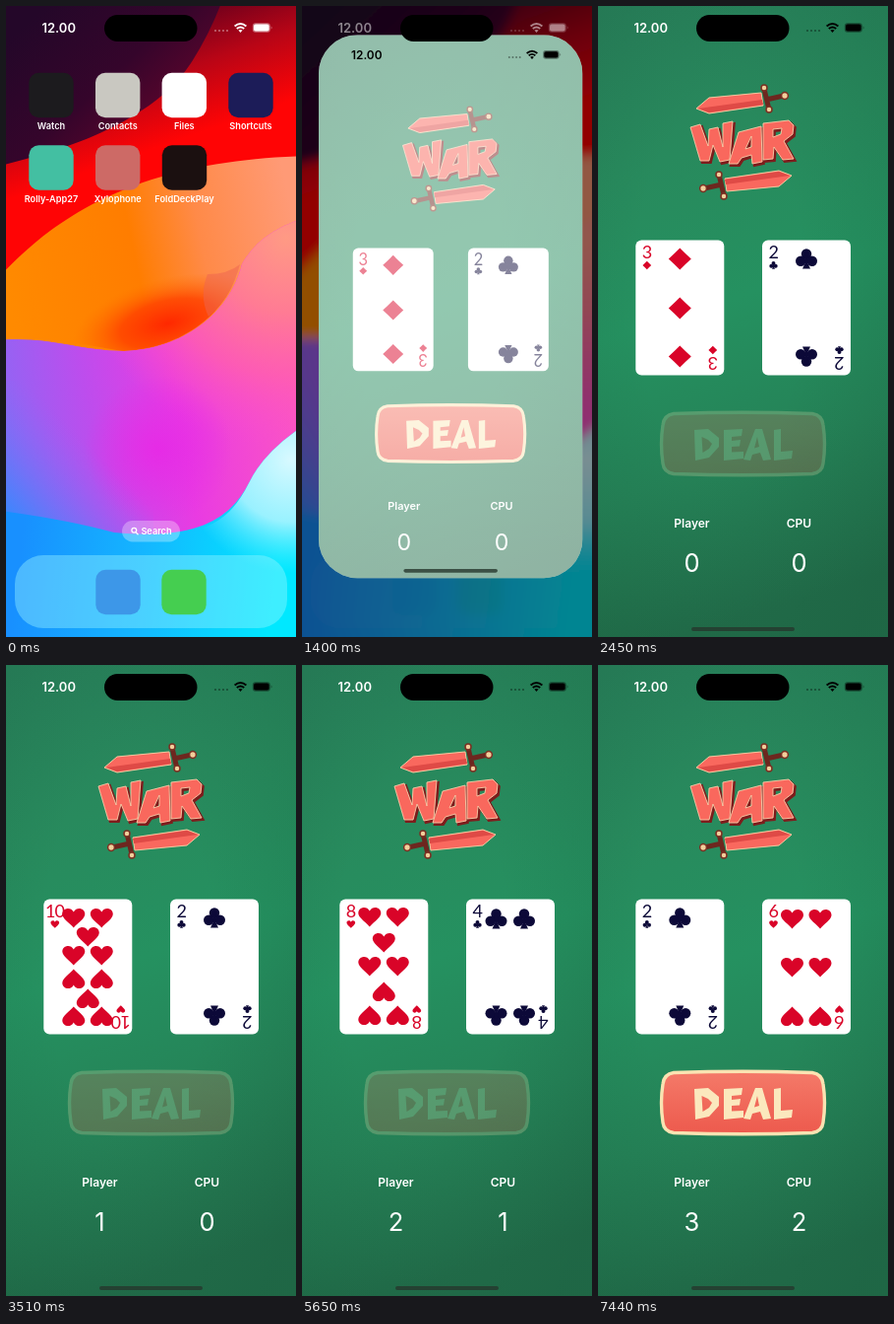
Animation, 295 px wide and 640 px high, one loop 8.11 s. Source, as an HTML page:

```html
<!DOCTYPE html>
<html lang="en">
<head>
<meta charset="utf-8">
<title>Card game</title>
<style>
  html, body { margin: 0; width: 100%; height: 100%; overflow: hidden; background: #000; }
  svg { display: block; width: 100vw; height: 100vh; }
  text { font-family: Inter, "Liberation Sans", sans-serif; text-anchor: middle; }
  .rank { font-family: Lato, "Open Sans", sans-serif; font-size: 18px; letter-spacing: -.05em; }
  .label { font-size: 9.2px; font-weight: 600; fill: #fff; }
</style>
</head>
<body>
<svg viewBox="0 0 295 640" preserveAspectRatio="none">
  <defs>
    <linearGradient id="red" gradientUnits="userSpaceOnUse" x1="225" y1="-10" x2="265" y2="105">
      <stop offset="0" stop-color="#6d001c"/><stop offset=".45" stop-color="#b80516"/><stop offset="1" stop-color="#ff0405"/>
    </linearGradient>
    <linearGradient id="night" gradientUnits="userSpaceOnUse" x1="40" y1="0" x2="150" y2="120">
      <stop offset="0" stop-color="#240729"/><stop offset=".6" stop-color="#35052b"/><stop offset="1" stop-color="#5a052c"/>
    </linearGradient>
    <linearGradient id="orange" gradientUnits="userSpaceOnUse" x1="0" y1="290" x2="295" y2="230">
      <stop offset="0" stop-color="#ff8a00"/><stop offset=".45" stop-color="#ff7d00"/><stop offset=".68" stop-color="#ff8a48"/><stop offset="1" stop-color="#ff9a76"/>
    </linearGradient>
    <radialGradient id="core" gradientUnits="userSpaceOnUse" cx="0" cy="0" r="1" gradientTransform="translate(165 322) rotate(-14) scale(100 46)">
      <stop offset="0" stop-color="#ff2800"/><stop offset=".5" stop-color="#ff4300" stop-opacity=".85"/><stop offset="1" stop-color="#ff7000" stop-opacity="0"/>
    </radialGradient>
    <linearGradient id="violet" gradientUnits="userSpaceOnUse" x1="0" y1="450" x2="295" y2="400">
      <stop offset="0" stop-color="#8f66f4"/><stop offset=".3" stop-color="#bd4ded"/><stop offset=".6" stop-color="#e93be2"/><stop offset="1" stop-color="#fb55c4"/>
    </linearGradient>
    <radialGradient id="pink" gradientUnits="userSpaceOnUse" cx="285" cy="235" r="215">
      <stop offset="0" stop-color="#ff9a84"/><stop offset=".35" stop-color="#ff7b94"/><stop offset=".65" stop-color="#ff5fae" stop-opacity=".8"/><stop offset="1" stop-color="#f94cd0" stop-opacity="0"/>
    </radialGradient>
    <radialGradient id="magenta" gradientUnits="userSpaceOnUse" cx="155" cy="450" r="75">
      <stop offset="0" stop-color="#e62be6"/><stop offset="1" stop-color="#e62be6" stop-opacity="0"/>
    </radialGradient>
    <linearGradient id="blueSide" gradientUnits="userSpaceOnUse" x1="0" y1="530" x2="85" y2="445">
      <stop offset="0" stop-color="#2a8dff"/><stop offset="1" stop-color="#8a6cf4" stop-opacity="0"/>
    </linearGradient>
    <linearGradient id="sea" gradientUnits="userSpaceOnUse" x1="10" y1="590" x2="270" y2="620">
      <stop offset="0" stop-color="#1890ff"/><stop offset=".5" stop-color="#14b8ff"/><stop offset="1" stop-color="#00e8ff"/>
    </linearGradient>
    <radialGradient id="foam" gradientUnits="userSpaceOnUse" cx="290" cy="460" r="115">
      <stop offset="0" stop-color="#d8f9ff"/><stop offset=".55" stop-color="#b4f4ff" stop-opacity=".85"/><stop offset="1" stop-color="#60e8ff" stop-opacity="0"/>
    </radialGradient>
    <linearGradient id="felt" x1=".15" y1="0" x2=".3" y2="1">
      <stop offset="0" stop-color="#28805a"/><stop offset=".25" stop-color="#288a5d"/><stop offset=".5" stop-color="#259160"/><stop offset=".75" stop-color="#258257"/><stop offset="1" stop-color="#226d4a"/>
    </linearGradient>
    <radialGradient id="feltEdge" cx=".42" cy=".45" r=".72">
      <stop offset=".4" stop-color="#0b4028" stop-opacity="0"/><stop offset="1" stop-color="#0b4028" stop-opacity=".14"/>
    </radialGradient>
    <linearGradient id="coral" x1="0" y1="0" x2="0" y2="1">
      <stop offset="0" stop-color="#f47a69"/><stop offset="1" stop-color="#ed5a4d"/>
    </linearGradient>
    <filter id="soft" x="-10%" y="-10%" width="120%" height="120%"><feGaussianBlur id="blur" stdDeviation="0"/></filter>
    <clipPath id="clip"><rect id="clipRect"/></clipPath>
    <g id="heart"><path d="M0 10C-4 5-11.5 1-11.5-4C-11.5-10-3-12 0-6C3-12 11.5-10 11.5-4C11.5 1 4 5 0 10Z"/></g>
    <g id="diamond"><path d="M0-11Q6-5 11.5 0Q6 5 0 11Q-6 5-11.5 0Q-6-5 0-11Z"/></g>
    <g id="club"><circle cy="-5" r="5.2"/><circle cx="-5.8" cy="2.2" r="5.2"/><circle cx="5.8" cy="2.2" r="5.2"/><path d="M-2-3H2L1.3 4L4 10H-4L-1.3 4Z"/></g>
    <g id="spade"><path d="M0-10C4-5 11-1 11 3C11 9 3 10 1 5L4 10H-4L-1 5C-3 10-11 9-11 3C-11-1-4-5 0-10Z"/></g>
    <g id="sword">
      <path d="M100 104L113 93L166 88L168 101L113 109Z" fill="#f9685e" stroke="#f7c9a0"/>
      <path d="M102 104L167 95L168 100L113 108Z" fill="#df4a46"/>
      <path d="M169 84L174 105M171 95L189 91" stroke="#6d271f" stroke-width="5"/>
      <g fill="#f3cf9b" stroke="#7b3023" stroke-width="1.5"><circle cx="169" cy="83" r="3"/><circle cx="174" cy="105" r="3"/><circle cx="190" cy="91" r="3.4"/></g>
    </g>
    <path id="title" fill-rule="evenodd" d="M94 123L104 120L112 142L113 125L122 123L127 143L127 119L137 117L134 156L124 158L117 141L113 157L104 157Z
      M143 128L166 122L167 158L157 160L156 151L146 154L142 160L133 160ZM156 132L156 143L150 145Z
      M168 119L194 116L199 121L198 130L189 137L199 155L188 156L179 143L178 155L168 156ZM178 125L187 124L186 130L178 133Z"/>
    <g id="courtHalf">
      <path d="M40 18L35 4L44 8L52 2L60 8L69 5L65 20L66 38L56 40L58 19Z" fill="#17133f"/>
      <path d="M40 13L66 12L65 17L41 18Z" fill="#c51f3a"/>
      <path d="M42 18H58V35L53 42H46L42 34L39 29Z" fill="#f8d4b0"/>
      <path d="M57 18H63Q60 27 64 35L56 38Z" fill="#a42a2b"/>
      <path d="M36 31Q43 33 45 28Q49 33 55 30Q47 38 36 31Z" fill="#a42a2b"/>
      <path d="M44 22H48M51 22H55" stroke="#17133f" stroke-width="1.5"/>
    </g>
  </defs>

  <g id="home">
    <g filter="url(#soft)">
      <path d="M-20-20H315V660H-20Z" fill="url(#red)"/>
      <path d="M-20-20H225Q212 20 190 55C165 95 110 137-20 165Z" fill="url(#night)"/>
      <path d="M-20 290C40 218 130 154 315 152V480H-20Z" fill="url(#orange)"/>
      <path d="M50 260H239C228 310 180 348 118 350L50 338Z" fill="url(#core)"/>
      <path d="M205 272Q226 272 238 262Q229 296 206 315Q196 294 205 272Z" fill="#ee6450" opacity=".5"/>
      <g id="wave">
        <path id="wavePath" d="M-20 340C45 333 70 350 120 350C180 348 228 312 240 262Q260 225 315 212V660H-20Z" fill="url(#violet)"/>
        <use href="#wavePath" style="fill:none"/>
      </g>
      <path d="M-20 340C45 333 70 350 120 350C180 348 228 312 240 262Q260 225 315 212V660H-20Z" fill="url(#pink)"/>
      <circle cx="155" cy="450" r="75" fill="url(#magenta)"/>
      <path d="M-20 380H150V570H-20Z" fill="url(#blueSide)"/>
      <path id="shore" d="M-20 510Q60 520 110 534C195 542 228 520 247 484Q264 448 315 418V660H-20Z" fill="url(#sea)"/>
      <path d="M180 533C215 530 233 512 247 484Q264 448 315 418V660H180Z" fill="url(#foam)"/>
      <g id="icons"></g>
    </g>
    <rect id="dim" width="295" height="640"/>
    <g id="homeStatus"></g>
  </g>

  <g id="app">
    <g clip-path="url(#clip)">
      <rect width="295" height="640" fill="#fff"/>
      <g id="content">
        <rect width="295" height="640" fill="url(#felt)"/>
        <rect width="295" height="640" fill="url(#feltEdge)"/>
        <use href="#sword"/>
        <use href="#sword" transform="rotate(180 148.5 138)"/>
        <use href="#title" x="1.8" y="2" fill="#7d1c1c" stroke="#7d1c1c" stroke-width="2"/>
        <use href="#title" fill="#f9685d" stroke="#f8cfaa" stroke-width=".9"/>
        <g id="cards"></g>
        <g id="button">
          <path d="M77 413.5Q147 411 218 413.5Q228 415 229 425Q232 444 229 464Q228 473 218 474.5Q147 477 77 474.5Q67 473 66 464Q63 444 66 425Q67 415 77 413.5Z" fill="url(#coral)" stroke="#fae3b2" stroke-width="3.4"/>
          <path fill="#fbe8bd" fill-rule="evenodd" d="M98 430L112 429L123 438L123 447L113 458L99 461ZM105.5 437L112 440L116 444L113 449L106.5 453Z
            M128 430L147 429L146 436L136 437V441L145 440L144 446.5L136 447V452.5L148 452V459L128 461Z
            M160 429L167 429L176 460L168 461L165 453L157 455L155 461L148 460ZM162 437L164 447L159 448.5Z
            M179 430L186 429V452L198 451L197 459L179 461Z"/>
        </g>
        <g fill="#fff">
          <g font-size="12" font-weight="600"><text x="95.5" y="529">Player</text><text x="204.5" y="529">CPU</text></g>
          <g font-size="25.5"><text id="playerScore" x="95.5" y="574"></text><text id="cpuScore" x="204.5" y="574"></text></g>
        </g>
      </g>
      <rect id="tile" width="295" height="640" fill="#1b1010"/>
      <g id="chrome">
        <g id="appStatus"></g>
        <rect id="homeBar" x="95" width="105" height="4" rx="2" fill="#26372e" opacity=".8"/>
      </g>
    </g>
  </g>
  <rect x="100" y="9" width="94.5" height="27" rx="13.5"/>
</svg>
<script>
const LOOP = 8110, LAUNCH = 1190, OPENED = 1940;
const $ = id => document.getElementById(id);
const clamp = v => Math.max(0, Math.min(1, v));
const mix = (a, b, p) => a + (b - a) * p;
const set = (id, attrs) => { for (const k in attrs) $(id).setAttribute(k, attrs[k]); };

// Each press reveals the next hand: [rank, suit] for player and CPU, then scores.
const hands = [
  { player: [3, 'diamond'], cpu: [2, 'club'], score: [0, 0] },
  { player: [10, 'heart'], cpu: [2, 'club'], score: [1, 0] },
  { player: [4, 'heart'], cpu: ['J', 'spade'], score: [1, 1] },
  { player: [8, 'heart'], cpu: [4, 'club'], score: [2, 1] },
  { player: [10, 'heart'], cpu: [8, 'club'], score: [3, 1] },
  { player: [2, 'club'], cpu: [6, 'heart'], score: [3, 2] }
];
const presses = [[2450, 2970], [3510, 4040], [4570, 5110], [5650, 6170], [6860, 7440]];

// Rows of pips: paired rows use two columns, single rows the middle one.
const layouts = {
  2: { single: [19, 118] },
  3: { single: [19, 69, 118] },
  4: { pair: [20, 118] },
  6: { pair: [20, 69, 119] },
  8: { pair: [18, 68, 118], single: [44, 94] },
  10: { pair: [19, 57, 81, 119], single: [38, 101] }
};

function pip(suit, x, y, scale = 1, flip = y > 75 && scale === 1) {
  return `<use href="#${suit}" transform="translate(${x} ${y}) scale(${scale}) rotate(${flip ? 180 : 0})"/>`;
}

function court() {
  return `<rect x="7" y="7" width="76" height="123" rx="5" fill="none" stroke="#17133f" stroke-width=".8"/>
    <path d="M4 4H20V35H4ZM70 102H86V133H70Z" fill="#fff"/>
    <use href="#courtHalf"/><use href="#courtHalf" transform="rotate(180 45 68.5)"/>
    <path d="M40 40Q47 45 56 40Q76 40 80 58Q84 78 70 90Q62 98 50 97Q43 92 34 97Q14 97 10 79Q6 59 20 47Q28 39 40 40Z" fill="#1b1748"/>
    <path d="M13 77L73 50L79 61L20 89Z" fill="#bd1f3c"/>
    <path d="M16 81L74 55M20 86L77 60" stroke="#6d1840" stroke-width="1.2" stroke-dasharray="3 2"/>
    <path d="M20 54L29 48L37 54L45 47L54 52L64 45M26 92L36 84L45 91L54 83L63 92L72 82M14 66L32 58M58 79L76 71" fill="none" stroke="#a8244f" stroke-width="2" stroke-dasharray="3 2.5"/>
    <circle cx="45" cy="69" r="4" fill="#1b1748"/>`;
}

function card(x, [rank, suit]) {
  const colour = suit === 'heart' || suit === 'diamond' ? '#d90428' : '#0c0938';
  const index = `<text class="rank" x="11.2" y="18.8"${rank === 'J' ? ' font-weight="700"' : ''}>${rank}</text>${pip(suit, 11.5, 25.5, .38)}`;
  const { pair = [], single = [] } = layouts[rank] || {};
  const pips = pair.map(y => pip(suit, 30.5, y) + pip(suit, 59, y)).join('') +
    single.map(y => pip(suit, 45, y)).join('');
  return `<g transform="translate(${x} 237.5)" fill="${colour}"><rect width="90" height="137" rx="6" fill="#fff"/>
    ${rank === 'J' ? court() : pips}${index}<g transform="rotate(180 45 68.5)">${index}</g></g>`;
}

function status(colour) {
  return `<text class="clock" x="53.7" y="26.7" font-size="13" font-weight="600" fill="${colour}">12.00</text>
    <g fill="${colour}"><g opacity=".4">${[213, 217, 221, 225].map(x => `<circle cx="${x}" cy="25" r="1.1"/>`).join('')}</g>
    <g fill="none" stroke="${colour}" stroke-width="2"><path d="M232.6 20.5Q238.5 15.5 244.4 20.5M234.8 23Q238.5 20 242.2 23"/></g>
    <path d="M236.4 24.6Q238.5 23.2 240.6 24.6L238.5 27Z"/>
    <rect x="250.8" y="17.3" width="18" height="9.4" rx="3" opacity=".4"/><rect x="252" y="18.5" width="15.6" height="7" rx="2"/>
    <path d="M269.7 20.3Q271.5 22 269.7 23.7Z" opacity=".5"/></g>`;
}

function icon(x, y, colour, name = '') {
  return `<rect x="${x - 22.7}" y="${y - 22.7}" width="45.4" height="45.4" rx="10" fill="${colour}"/>
    <text class="label" x="${x}" y="${y + 34.5}">${name}</text>`;
}

$('icons').innerHTML = [
  [46, 90.5, '#1c1b1e', 'Watch'], [113.7, 90.5, '#c9c8c1', 'Contacts'],
  [181.3, 90.5, '#fff', 'Files'], [249, 90.5, '#1c1c58', 'Shortcuts'],
  [46, 164, '#43bfa2', 'Rolly-App27'], [113.7, 164, '#cd6a66', 'Xylophone'],
  [181.5, 164, '#1b1010', 'FoldDeckPlay']
].map(a => icon(...a)).join('') +
  `<rect x="118" y="522" width="59" height="21.5" rx="10.7" fill="#fff" opacity=".3"/>
  <g fill="none" stroke="#fff" stroke-width="1.3"><circle cx="130.3" cy="531.8" r="2.4"/><path d="M132 533.6L134.5 536.2"/></g>
  <text class="label" x="153" y="536">Search</text>
  <rect x="9" y="557" width="277" height="74" rx="29" fill="#9cf4ff" opacity=".4"/>` +
  icon(114, 594.5, '#3d97e8') + icon(181, 594.5, '#45ce50');
$('homeStatus').innerHTML = status('#fff');
$('appStatus').innerHTML = status('#000');
const clock = $('appStatus').querySelector('.clock');

// Motion advances in even steps.
const stepAt = (t, [from, to], count) => Math.min(count - 1, Math.floor((t - from) / (to - from) * (count - 1) + .05));

function drawLaunch(t) {
  const open = t >= OPENED;
  $('app').style.display = t < LAUNCH ? 'none' : '';
  $('home').style.display = open ? 'none' : '';
  const now = t < LAUNCH ? 0 : LAUNCH + stepAt(t, [LAUNCH, OPENED], 8) * (OPENED - LAUNCH) / 7;
  const spring = Math.max(0, now - 1150) * .015;
  const p = open ? 1 : 1 - (1 + spring) * Math.exp(-spring);
  const x = mix(159, 0, p), y = mix(141, 0, p ** 2.08);
  const scale = mix(46, 295, p) / 295, height = mix(46, 640, p ** 1.45) / scale;
  set('app', { transform: `translate(${x} ${y}) scale(${scale})` });
  set('clipRect', { width: 295, height, rx: open ? 0 : mix(10, 43, p) / scale });
  set('homeBar', { y: height - 10 });
  set('content', { opacity: clamp((now - 1300) / 210) });
  set('tile', { opacity: clamp(1 - p * 1.15) });
  set('chrome', { opacity: clamp((now - 1250) / 100) });
  clock.setAttribute('fill', now > 1700 ? '#fff' : '#000');
  set('blur', { stdDeviation: 6 * p });
  set('icons', { opacity: 1 - p });
  set('dim', { opacity: .48 * p });
  set('homeStatus', { opacity: 1 - .55 * p });
}

let shown = -1;
function drawGame(t) {
  let hand = 0, opacity = 1;
  presses.forEach((press, i) => {
    if (t < press[0]) return;
    const step = stepAt(t, press, 6);
    hand = step > 0 ? i + 1 : i;
    opacity = mix(.23, 1, clamp((step - .5) / 4.5));
  });
  set('button', { opacity });
  if (hand === shown) return;
  shown = hand;
  const { player, cpu, score } = hands[hand];
  $('cards').innerHTML = card(38.3, player) + card(167, cpu);
  $('playerScore').textContent = score[0];
  $('cpuScore').textContent = score[1];
}

let start;
function frame(now) {
  start ??= now;
  const t = (now - start) % LOOP;
  drawLaunch(t);
  drawGame(t);
  requestAnimationFrame(frame);
}
requestAnimationFrame(frame);
</script>
</body>
</html>
```
